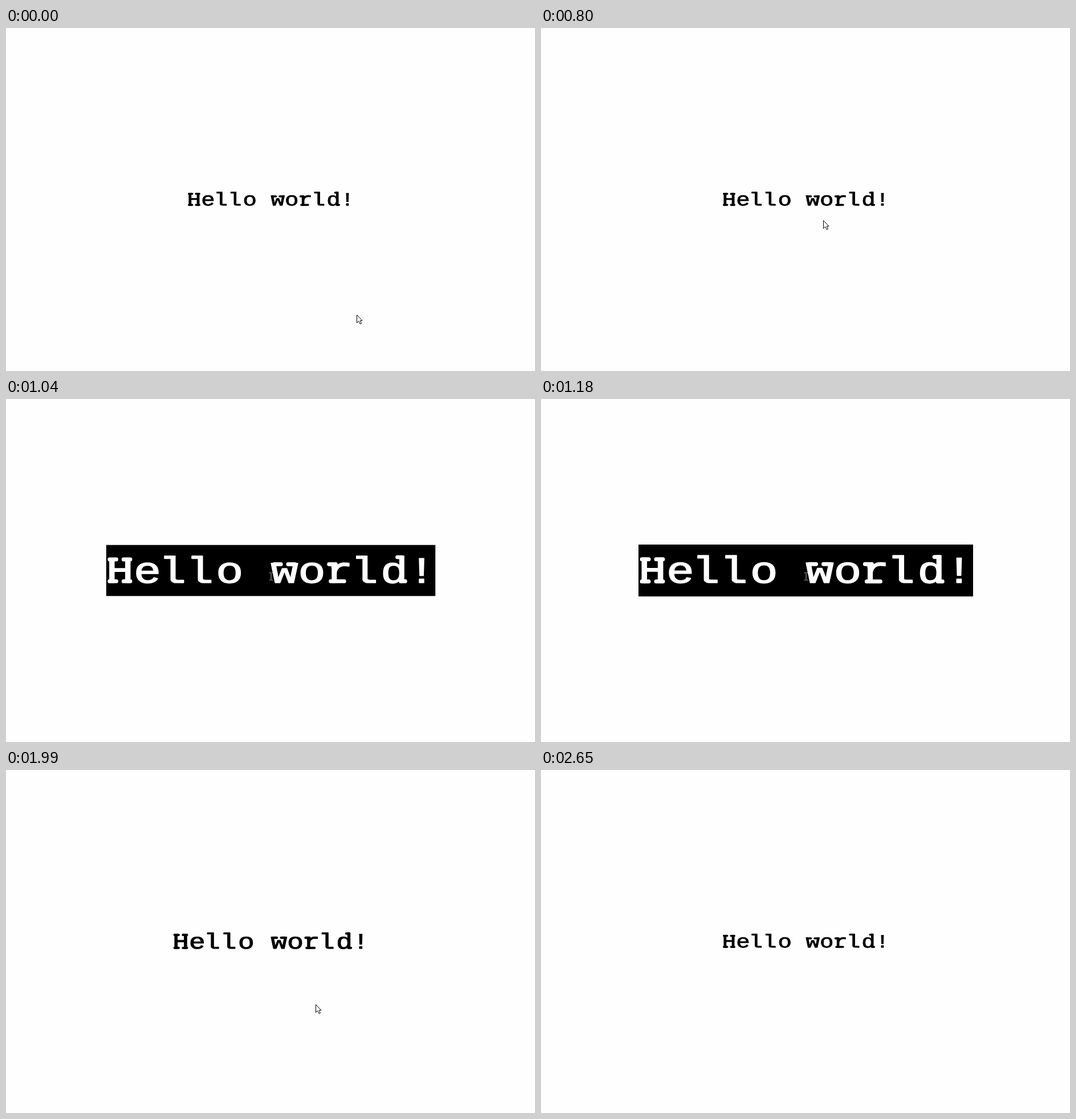
An HTML page for the animation above (4.2 s loop, 928 by 603 pixels).

```html
<!DOCTYPE html>
<html lang="en">
<head>
<meta charset="utf-8">
<title>Hover zoom</title>
<style>
  html, body { margin: 0; width: 100%; height: 100%; overflow: hidden; background: #fefefe; }
  svg { display: block; width: 928px; height: 603px; }
  #label { color: #000; }
  #label.hover { color: #fff; }
  #box { visibility: hidden; }
  #label.hover #box { visibility: visible; }
  text {
    font: 40.76px "Liberation Mono", "Courier New", monospace;
    fill: currentColor;
    stroke: currentColor;
    stroke-width: 1px;
    stroke-linejoin: round;
    text-rendering: geometricPrecision;
    white-space: pre;
  }
  #slabs { fill: none; stroke: currentColor; stroke-width: 3.5; stroke-linecap: round; }
  #arrow { fill: #fff; stroke: #000; }
  #beam { fill: none; stroke: #bbb; }
</style>
</head>
<body>
<svg viewBox="0 0 928 603">
  <g id="label">
    <rect id="box" x="-146.75" y="-22.8" width="293.5" height="45.6"/>
    <text x="-146.75" y="13.4" transform="scale(1 .81)">He<tspan dx="-2.2">ll</tspan><tspan dx="2.2">o wor</tspan><tspan dx="-2.2">l</tspan><tspan dx="2.2">d!</tspan></text>
    <path id="slabs"/>
  </g>
  <path id="arrow" d="M.5 .5V14.3L3.7 11.3L6 16.3L8.4 15.3L6.2 10.4H10Z"/>
  <path id="beam" d="M-3 -6.5H-1L0 -5.5L1 -6.5H3M0 -5.5V5.5M-3 6.5H-1L0 5.5L1 6.5H3"/>
</svg>
<script>
  const LOOP = 4200, TICK = 133, LEAD = 25;
  const ENTER = 853, LEAVE = 1858, ZOOM = 310;
  const [label, slabs, arrow, beam] =
    ['label', 'slabs', 'arrow', 'beam'].map(id => document.getElementById(id));

  // Serif bars that turn the plain letters into slab letters
  const PITCH = 24.46, LEFT = -146.75;
  const CAP = -9.9, ASC = -11.9, MID = -5.6, FOOT = 9.6;
  const slab = (cell, x, y, w = 6) => `M${LEFT + cell * PITCH + x - w / 2} ${y}h${w}`;
  const pair = (cell, y) => slab(cell, 6, y) + slab(cell, PITCH - 6, y);
  slabs.setAttribute('d',
    pair(0, CAP) + pair(0, FOOT) +
    pair(6, MID) +
    slab(8, 6, MID) + slab(8, 10.5, FOOT, 12) +
    slab(10, 17, ASC, 4) + slab(10, 20, FOOT, 4));

  // Pointer path: quadratic curves, each followed at an even pace
  const legs = [
    { start: 0, time: 133, from: [615, 504], via: [620, 508], to: [624, 512] },
    { start: 133, time: 827, from: [624, 512], via: [540, 369], to: [465, 312] },
    { start: LEAVE, time: 800, from: [501, 357], via: [600, 523], to: [960, 629] }
  ];

  const clamp = u => Math.min(1, Math.max(0, u));
  const easeOut = u => 1 - (1 - clamp(u)) ** 3;

  function pointerAt(t) {
    const { start, time, from, via, to } = legs.findLast(leg => leg.start <= t);
    const u = clamp((t - start) / time), v = 1 - u;
    return from.map((a, i) => Math.round(v * v * a + 2 * u * v * via[i] + u * u * to[i]));
  }

  function draw() {
    // The picture advances in even ticks, like a screen recording
    const t = Math.floor((performance.now() % LOOP + LEAD) / TICK) * TICK;
    const hover = t >= ENTER && t < LEAVE;
    const scale = 1 + easeOut((t - ENTER) / ZOOM) - easeOut((t - LEAVE) / ZOOM);
    label.setAttribute('transform', `translate(464.5 301.5) scale(${scale})`);
    label.classList.toggle('hover', hover);
    for (const [el, shown] of [[arrow, !hover], [beam, hover]]) {
      el.setAttribute('transform', `translate(${pointerAt(t)})`);
      el.setAttribute('visibility', shown ? 'visible' : 'hidden');
    }
    requestAnimationFrame(draw);
  }
  draw();
</script>
</body>
</html>
```
